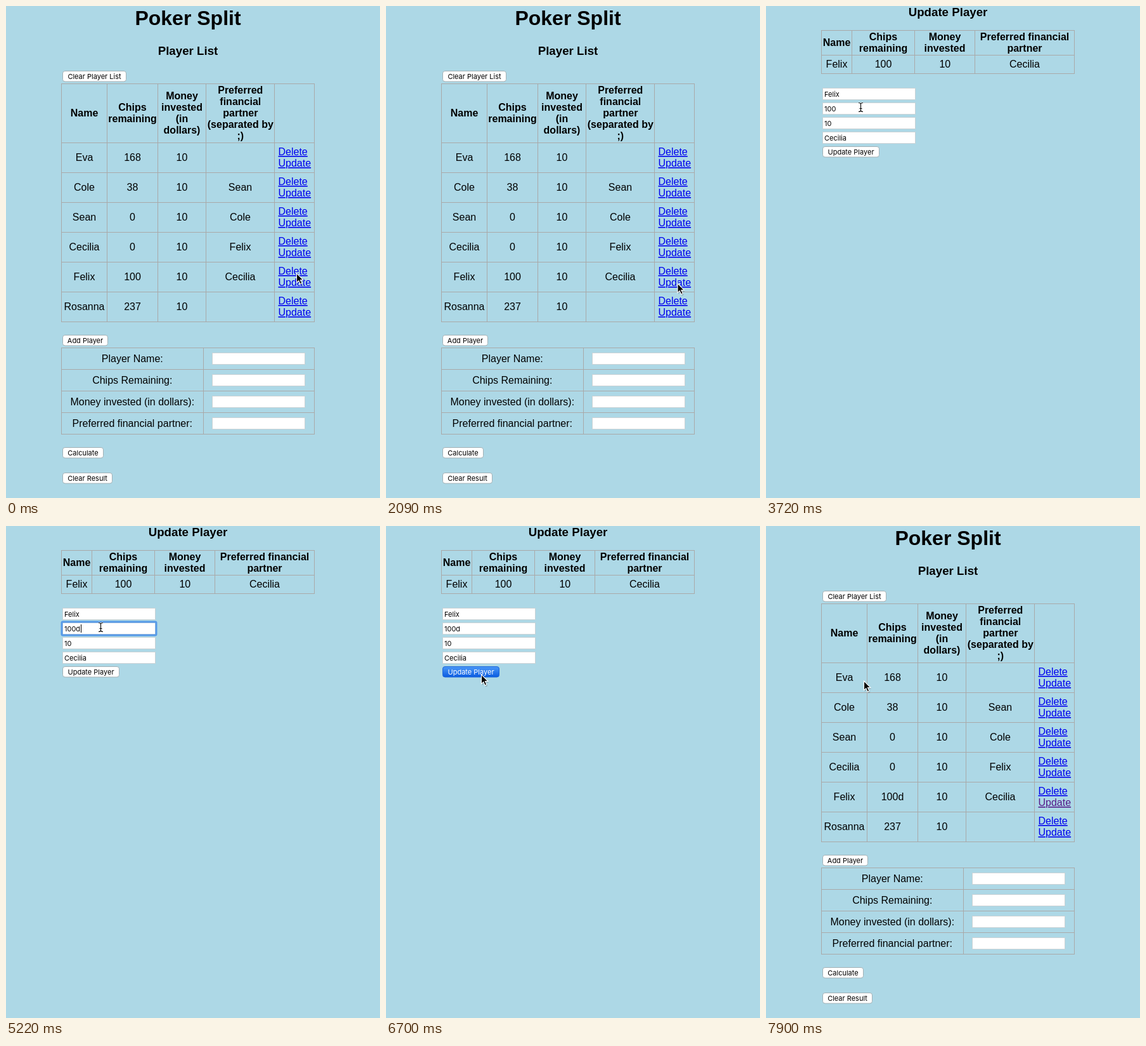
An HTML page that plays this animation: 590 by 775 pixels, repeating every 8 s.

```html
<!DOCTYPE html>
<html lang="en">
<head>
<meta charset="utf-8">
<title>Poker Split</title>
<style>
  html, body { margin: 0; width: 100%; height: 100%; overflow: hidden; background: #add8e6; }
  svg { display: block; font: 16px "Liberation Sans", Arial, sans-serif; }
  .mid { text-anchor: middle; }
  .bold { font-weight: bold; }
  .h1 { font-size: 32px; }
  .h2 { font-size: 18.72px; }
  .ui { font: 11px Inter, sans-serif; }
  .link { fill: #0000ee; text-decoration: underline; }
  .visited { fill: #551a8b; }
  .active { fill: #ff0000; }
  .grid { fill: none; stroke: #a9a9a9; }
</style>
</head>
<body>
<svg id="stage" width="590" height="775" viewBox="0 0 590 775">
  <defs>
    <linearGradient id="pressed" x2="0" y2="1">
      <stop stop-color="#4a98f8"/><stop offset="1" stop-color="#0a5be0"/>
    </linearGradient>
    <g id="arrow">
      <path d="M1 2V17L4.5 14.5 7 19.5 10 18 8 13H12Z" fill="#000" opacity=".16"/>
      <path d="M0 0V14.6L3.3 11.6 5.6 17 8.2 15.9 5.9 10.6H10.4Z" fill="#000" stroke="#fff" stroke-width="1.1"/>
    </g>
    <g id="hand">
      <path d="M4 9V2Q5.5 0 7 2V7Q8.5 6 9.5 7.5 11 6.7 12 8.2 14 7.5 14.4 10V13L12.6 18H5.5Q4 14.5 1 11 1 8.5 4 10.5Z" fill="#fff" stroke="#000" stroke-linejoin="round"/>
      <path d="M7 7V10M9.5 7.5V10M12 8.2V10.5" stroke="#000"/>
    </g>
    <g id="beam" fill="none">
      <path id="stem" d="M-3.5 -7Q-.5 -7 0 -5.5 .5 -7 3.5 -7M0 -5.5V5.5M-3.5 7Q-.5 7 0 5.5 .5 7 3.5 7M-2 2H2" stroke="#fff" stroke-width="2.2" stroke-opacity=".7"/>
      <use href="#stem"/>
      <path d="M-3.5 -7Q-.5 -7 0 -5.5 .5 -7 3.5 -7M0 -5.5V5.5M-3.5 7Q-.5 7 0 5.5 .5 7 3.5 7M-2 2H2" stroke="#000" stroke-width="1.1"/>
    </g>
  </defs>
  <g id="page"></g>
  <use id="cursor"/>
</svg>
<script>
const LOOP = 8000;
const page = document.getElementById('page');
const cursor = document.getElementById('cursor');

const players = [
  ['Eva', '168', ''], ['Cole', '38', 'Sean'], ['Sean', '0', 'Cole'],
  ['Cecilia', '0', 'Felix'], ['Felix', '100', 'Cecilia'], ['Rosanna', '237', ''],
];

// start time, pointer shape, x, y
const pointer = [
  [0, 'arrow', 458.5, 421], [150, 'arrow', 459.5, 437], [590, 'hand', 455.5, 436.5],
  [2090, 'arrow', 460, 437], [2980, 'arrow', 333, 353], [3130, 'beam', 130.5, 171.5],
  [3280, 'beam', 144.5, 149.5], [3430, 'beam', 153.5, 145.5], [3720, 'beam', 149.5, 159.5],
  [5660, 'beam', 152.5, 215.5], [5810, 'arrow', 154, 222], [5960, 'arrow', 145, 239],
  [6400, 'arrow', 147, 238], [6550, 'arrow', 150.5, 234], [7900, 'arrow', 154.5, 244],
];

const text = (s, x, y, cls = 'mid') => `<text x="${x}" y="${y}" class="${cls}">${s}</text>`;
const lines = (s, x, y) => s.split('|').map((part, i) => text(part, x, y + 18 * i, 'mid bold')).join('');

function grid(xs, ys) {
  const [left, right, top, bottom] = [xs[0], xs.at(-1), ys[0], ys.at(-1)];
  const d = xs.map(x => `M${x + .5} ${top}V${bottom + 1}`).join('') +
            ys.map(y => `M${left} ${y + .5}H${right + 1}`).join('');
  return `<path class="grid" d="${d}"/>`;
}

function button(label, y, w, pressed) {
  const [fill, stroke, ink] = pressed ? ['url(#pressed)', '#1c66d8', '#fff'] : ['#fff', '#a3b1b6', '#000'];
  return `<rect x="89.5" y="${y + .5}" width="${w - 1}" height="16.5" rx="3.5" fill="${fill}" stroke="${stroke}"/>` +
    `<text x="${89 + w / 2}" y="${y + 12.5}" class="ui mid" fill="${ink}">${label}</text>`;
}

const input = (x, y, value = '') =>
  `<rect x="${x + .5}" y="${y + .5}" width="146" height="18" fill="#fff" stroke="#cbd2d5"/>` +
  text(value, x + 3, y + 13.5, 'ui');

function listPage(chips, linkState) {
  const rows = players.map(([name, amount, partner], i) => {
    const y = 244 + 47 * i, edited = i === 4;
    return text(name, 123.5, y) + text(edited ? chips : amount, 199.5, y) +
      text('10', 277.5, y) + text(partner, 369.5, y) +
      text('Delete', 429.5, y - 9, 'link') +
      text('Update', 429.5, y + 9, 'link ' + (edited ? linkState : ''));
  }).join('');
  const fields = ['Player Name:', 'Chips Remaining:', 'Money invested (in dollars):', 'Preferred financial partner:']
    .map((label, i) => text(label, 199.3, 561 + 34 * i) + input(325, 546 + 34 * i)).join('');
  return text('Poker Split', 287, 30, 'mid bold h1') + text('Player List', 287, 77, 'mid bold h2') +
    button('Clear Player List', 102, 101) +
    grid([87, 159, 239, 315, 423, 486], [122, 215, 262, 309, 356, 403, 450, 497]) +
    lines('Name', 123.5, 174) + lines('Chips|remaining', 199.5, 165) +
    lines('Money|invested|(in|dollars)', 277.5, 147) +
    lines('Preferred|financial|partner|(separated by|;)', 369.8, 138) + rows +
    button('Add Player', 518, 72) +
    grid([87, 311, 486], [538, 572, 606, 640, 674]) + fields +
    button('Calculate', 695, 65) + button('Clear Result', 735, 79);
}

function updatePage(chips, focused, caretOn, pressed) {
  const [name, amount, partner] = players[4];
  const ring = focused
    ? '<rect x="88" y="151" width="149" height="21" rx="1.5" fill="none" stroke="#569ae8" stroke-width="3"/>' : '';
  const caret = caretOn
    ? `<rect x="${chips.length > 3 ? 118 : 111}" y="155" width="1" height="13"/>` : '';
  return text('Update Player', 287, 16, 'mid bold h2') +
    grid([87, 135, 234, 329, 486], [38, 77, 106]) +
    lines('Name', 111.5, 63) + lines('Chips|remaining', 185, 54) +
    lines('Money|invested', 282, 54) + lines('Preferred financial|partner', 408, 54) +
    text(name, 111.5, 97) + text(amount, 185, 97) + text('10', 282.3, 97) + text(partner, 408, 97) +
    [name, chips, '10', partner].map((value, i) => input(89, 129 + 23 * i, value)).join('') +
    ring + caret + button('Update Player', 221, 90, pressed);
}

function view(t) {
  const within = (a, b) => t >= a && t < b;
  if (t < 2540) return listPage('100', within(590, 740) ? 'active' : '');
  if (t >= 7150) return listPage('100d', 'visited');
  const caretOn = within(4020, 4620) || within(5070, 5660) || within(6260, 6700);
  return updatePage(t < 5220 ? '100' : '100d', within(4020, 6700), caretOn, t >= 6700);
}

let shown;
function draw(now) {
  const t = now % LOOP;
  const markup = view(t);
  if (markup !== shown) page.innerHTML = shown = markup;
  const [, shape, x, y] = pointer.findLast(p => p[0] <= t);
  cursor.setAttribute('href', '#' + shape);
  cursor.setAttribute('transform', `translate(${x} ${y})`);
}

const start = performance.now();
function tick() {
  draw(performance.now() - start);
  requestAnimationFrame(tick);
}
tick();
</script>
</body>
</html>
```
